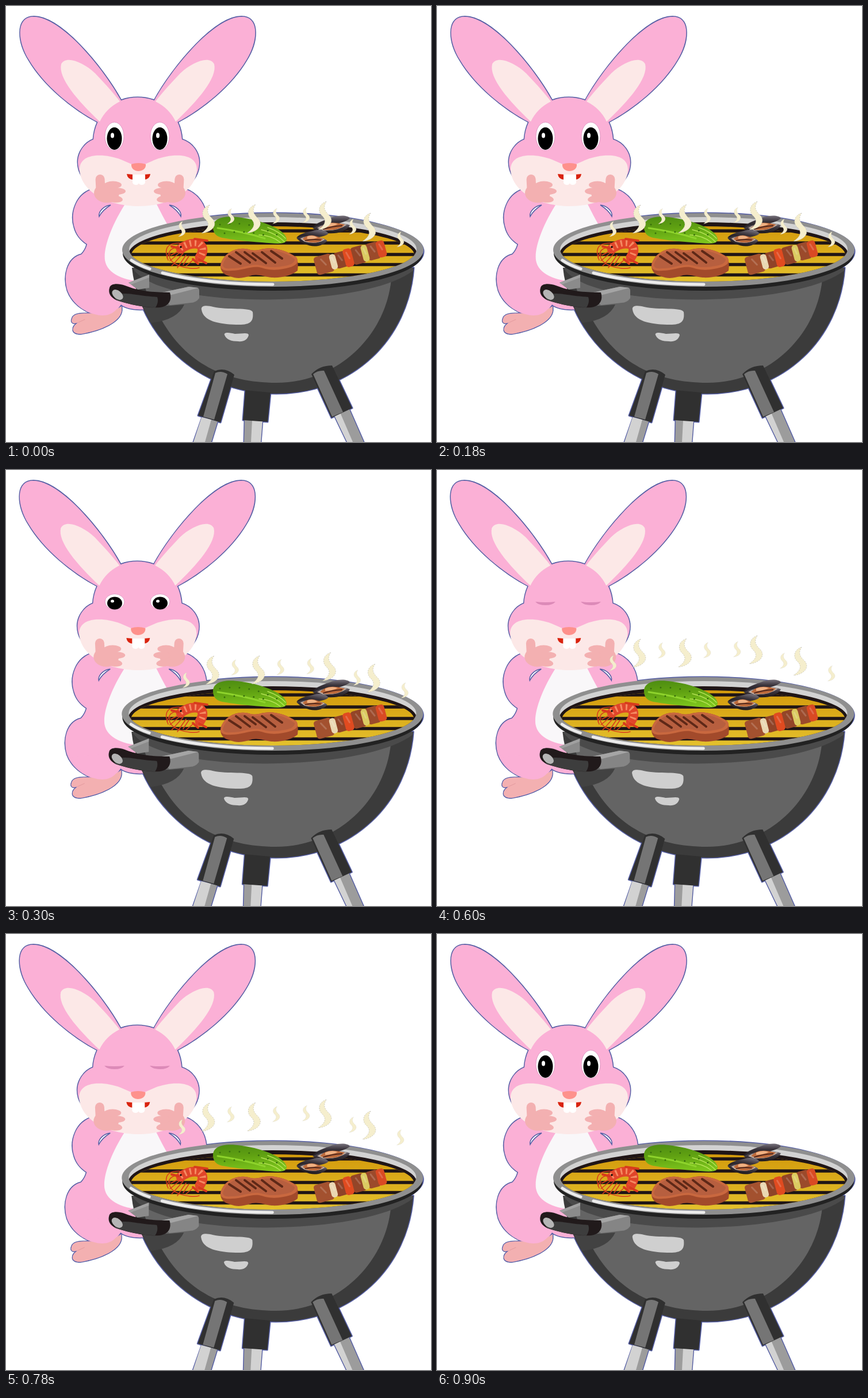
Animation of 739 by 758 pixels, one loop 1.2 s. Source, as an HTML page:

```html
<!DOCTYPE html>
<html lang="en">
<head>
<meta charset="utf-8">
<title>Rabbit at the barbecue</title>
<style>
html, body { margin: 0; width: 100%; height: 100%; overflow: hidden; background: #fff }
svg { display: block; width: 100%; height: 100% }
.line { fill: none; stroke-linecap: round; stroke-linejoin: round }
</style>
</head>
<body>
<svg viewBox="0 0 739 758">
<defs>
  <linearGradient id="coals" x2="0" y2="1"><stop stop-color="#d39a0c"/><stop offset="1" stop-color="#e5c32e"/></linearGradient>
  <linearGradient id="peel" x2=".15" y2="1"><stop stop-color="#4d8c12"/><stop offset=".45" stop-color="#5fa012"/><stop offset="1" stop-color="#7cc41c"/></linearGradient>
  <linearGradient id="shell" x2="0" y2="1"><stop stop-color="#77727c"/><stop offset=".45" stop-color="#3a343b"/><stop offset="1" stop-color="#1d191e"/></linearGradient>
  <clipPath id="opening"><ellipse cx="464" cy="423" rx="250" ry="56"/></clipPath>
  <clipPath id="grate"><ellipse cx="464" cy="433" rx="246" ry="50"/></clipPath>
  <path id="earShape" d="M200 164C169 107 91 12 43 19C18 23 20 62 40 94C66 138 116 179 160 202L185 215Z"/>
  <path id="footShape" d="M201 522C170 545 126 526 116 541C111 552 118 553 126 550C113 558 113 570 130 570C162 565 204 549 201 525Z"/>
  <g id="rabbitShape">
    <use href="#footShape"/>
    <path d="M153 318C122 325 111 360 119 385C123 400 132 408 141 414C139 422 135 428 131 432C106 438 99 470 107 495C115 517 140 537 168 538C185 538 195 527 200 519C210 527 230 529 245 527L330 480L349 368C347 345 334 326 311 318Z"/>
    <use href="#earShape"/>
    <use href="#earShape" transform="matrix(-1 0 0 1 458 0)"/>
    <path d="M229 159C270 159 303 188 306 232C325 238 336 255 336 272C336 291 325 306 311 317C300 340 265 348 231 348C197 348 162 340 153 317C136 306 125 290 125 271C125 255 136 238 152 232C155 188 188 159 229 159Z"/>
  </g>
  <path id="handleShape" d="M180 490C182 482 195 482 207 486C235 497 260 498 285 498C289 510 284 522 268 524C240 526 205 516 191 511C183 507 177 500 180 490Z"/>
  <path id="bowlShape" d="M219 455C231 569 331 674 470 674C603 674 700 579 709 455Z"/>
  <path id="legShape" d="M341 715L368 722L357 758H326ZM415 720H446L443 758H414ZM571 712L597 701L622 758H593Z"/>
  <path id="sleeveShape" d="M362 635Q380 627 397 641L373 724L334 712ZM416 668L460 672L455 723L412 720ZM531 640Q545 625 567 625L602 699L566 716Z"/>
  <g id="grillShape">
    <ellipse cx="464" cy="427" rx="262" ry="67"/>
    <use href="#bowlShape"/><use href="#legShape"/><use href="#sleeveShape"/><use href="#handleShape"/>
  </g>
  <g id="hand">
    <rect x="156" y="293" width="16" height="32" rx="8" transform="rotate(-3 164 309)"/>
    <ellipse cx="175" cy="325" rx="22" ry="17"/>
    <ellipse cx="186" cy="311" rx="15" ry="6.5"/>
    <ellipse cx="193" cy="322" rx="15" ry="6"/>
    <ellipse cx="188" cy="335" rx="15" ry="6.5" transform="rotate(8 188 335)"/>
  </g>
  <path id="innerEar" d="M163 201C125 165 90 125 96 101C104 85 135 98 155 117C175 138 190 155 198 166Q174 178 163 201Z"/>
  <path id="gap" d="M162 366C160 358 170 347 182 346C174 351 166 358 162 366Z"/>
  <path id="lip" fill="#d9230f" d="M210 292L221 293V302Q211 301 210 292Z"/>
  <g id="openEye">
    <ellipse cx="188.5" cy="226.5" rx="16.5" ry="24.5" fill="#fff" stroke="#d98cba" stroke-width=".8"/>
    <ellipse cx="188.5" cy="230.5" rx="13" ry="19.5"/>
    <ellipse cx="185" cy="225" rx="3" ry="4.5" fill="#fff"/>
  </g>
  <g id="halfEye">
    <ellipse cx="189" cy="229" rx="17" ry="13.5" fill="#fff" stroke="#d98cba" stroke-width=".8"/>
    <ellipse cx="189" cy="231.5" rx="13" ry="11"/>
    <ellipse cx="185" cy="228" rx="3" ry="2.5" fill="#fff"/>
  </g>
  <path id="shutEye" fill="#dc8ab8" d="M171 229Q188 231 206 229Q201 235 189 235Q176 235 171 229Z"/>
  <path id="wisp" d="M4-25C-9-21-12-8-3 0C5 8 2 16-10 24C5 23 19 12 10 0C2-8-3-14 4-25Z"/>
</defs>

<g id="scene">
  <g fill="none" stroke="#565fa5" stroke-width="3" stroke-linejoin="round">
    <use href="#rabbitShape"/><use href="#grillShape"/>
  </g>

  <!-- rabbit -->
  <use href="#rabbitShape" fill="#fbb0d6"/>
  <use href="#footShape" fill="#f3b0b1"/>
  <path fill="#fbb0d6" d="M110 500C118 520 142 537 168 538C185 538 195 527 200 515V490Z"/>
  <path class="line" stroke="#e39a9e" d="M126 550L137 545"/>
  <path fill="#f9f7f9" d="M208 343C184 380 169 420 172 442C176 466 205 478 245 480L330 430C288 405 275 368 261 343Z"/>
  <g fill="#fff" stroke="#565fa5" stroke-width="1.5">
    <use href="#gap"/><use href="#gap" transform="matrix(-1 0 0 1 466 0)"/>
  </g>
  <g fill="#fce8e7">
    <use href="#innerEar"/><use href="#innerEar" transform="matrix(-1 0 0 1 458 0)"/>
    <path d="M128 285C127 256 168 255 200 267Q216 274 230 280Q244 274 260 267C292 255 333 256 332 285C330 322 285 348 231 348C176 348 130 322 128 285Z"/>
  </g>
  <path fill="#fe918c" d="M218 275Q230 271 243 275C244 283 237 287 230 287C224 287 217 283 218 275Z"/>
  <use href="#lip"/><use href="#lip" transform="matrix(-1 0 0 1 461 0)"/>
  <path fill="#fff" d="M220 293H242V303Q243 311 236 311Q232 311 231 308Q230 311 226 311Q219 311 220 303Z"/>
  <g fill="#f3b0b1">
    <use href="#hand"/><use href="#hand" transform="matrix(-1 0 0 1 465 0)"/>
  </g>

  <!-- bowl -->
  <use href="#bowlShape" fill="#3b3b3b"/>
  <path fill="#646464" d="M238 475H670C660 575 575 655 470 655C380 655 312 620 270 545L245 500Z"/>
  <path fill="#4a4a4a" d="M220 455C260 528 620 528 708 460V455Z"/>
  <path fill="#424242" d="M238 522L285 521L310 519Q298 546 252 551Z"/>
  <g fill="#cfcfcf">
    <path d="M340 528C338 520 350 520 360 523C385 529 425 523 429 532C431 549 425 555 400 554C370 553 343 548 340 528Z"/>
    <path d="M380 572C378 566 390 568 398 570C410 570 421 567 422 572C420 581 412 584 404 583C392 583 383 580 380 572Z"/>
  </g>

  <!-- legs -->
  <use href="#legShape" fill="#9c9c9c"/>
  <path fill="#d2d2d2" d="M340 715L357 719L346 758H326ZM428 720H446L443 758H426ZM571 712L581 707L603 758H593Z"/>
  <use href="#sleeveShape" fill="#303030"/>
  <path fill="#757575" d="M364 638Q374 633 385 640L362 719L343 714ZM534 640Q542 633 553 634L586 706L567 714Z"/>

  <!-- rim and grate -->
  <ellipse cx="464" cy="430" rx="261" ry="65" fill="#222"/>
  <ellipse cx="464" cy="424" rx="262" ry="64" fill="#8f8f8f"/>
  <ellipse cx="464" cy="423" rx="250" ry="56" fill="#d2d2d2"/>
  <g clip-path="url(#opening)">
    <ellipse cx="464" cy="432" rx="251" ry="56" fill="#1f1516"/>
    <g clip-path="url(#grate)">
      <path fill="url(#coals)" d="M215 383H715V483H215Z"/>
      <path stroke="#1f1516" stroke-width="5.500" d="M215 391H715M215 412H715M215 432H715M215 449.500H715M215 467.500H715"/>
    </g>
  </g>
  <path class="line" stroke="#ececec" stroke-width="5" d="M218 442A257 60 0 0 0 250 457M272 464A257 60 0 0 0 464 484"/>

  <!-- handle -->
  <path fill="#8b8b8b" d="M213 481L249 467V490L229 493Z"/>
  <path fill="#a0a0a0" d="M213 481L249 467V472L218 484Z"/>
  <path fill="#858585" d="M262 500L318 488L333 490Q336 491 336 495V508Q330 516 321 516L285 520Z"/>
  <path fill="#a5a5a5" d="M262 500L318 488L335 490L288 502Z"/>
  <use href="#handleShape" fill="#211a1b"/>
  <path fill="#3d3d3d" d="M187 503C210 496 220 503 263 506Q266 515 260 524C235 524 205 516 191 511Z"/>
  <ellipse cx="194" cy="502" rx="7" ry="11" transform="rotate(-50 194 502)" fill="#b5b5b5"/>
</g>

<!-- cucumber -->
<path fill="url(#peel)" d="M360 386C359 369 378 363 410 368C452 374 486 390 488 405C488 416 470 413 445 411C415 409 392 406 376 403Q361 400 360 386Z"/>
<path class="line" stroke="#b4e254" stroke-width="1.500" d="M444 389Q470 395 484 410M440 398Q463 399 477 411M455 385Q475 392 486 404"/>
<path class="line" stroke="#8ed32c" stroke-width="3" d="M368 386Q415 393 450 404"/>
<path class="line" stroke="#39700c" stroke-width="3" stroke-dasharray="0 17" d="M372 380Q420 372 472 398M380 395Q420 388 462 402"/>

<!-- shrimp -->
<g class="line">
  <path stroke="#d83b1d" stroke-width="1.500" d="M310 413C270 408 278 432 282 442M306 419C285 418 283 428 280 438M303 425L287 433M303 428L285 443M308 430L288 452M313 433L298 455M318 435L308 450M285 430C278 450 320 460 336 455M326 441L313 452"/>
  <path stroke="#e0452a" stroke-width="17" d="M304 422Q320 410 336 414Q347 422 337 437"/>
  <path stroke="#f58a62" stroke-width="11" stroke-dasharray="3 6" stroke-linecap="butt" d="M303 421Q320 409 336 413Q348 422 337 438"/>
  <path stroke="#d83b1d" stroke-width="4" d="M328 405L350 408M336 441L348 447M325 440L334 448M300 421L288 418"/>
</g>
<circle cx="304" cy="419" r="1.700"/>

<!-- mussels -->
<g id="mussel">
  <path fill="url(#shell)" d="M533 385C540 376 553 373 568 367C582 363 595 364 598 369C590 377 570 380 545 386Z"/>
  <path fill="url(#shell)" d="M533 386C545 380 580 374 598 381C592 393 570 398 553 394C545 392 538 390 533 386Z"/>
  <path fill="#c4b2a7" d="M541 386Q563 374 593 380Q577 392 551 390Z"/>
  <path fill="#bd6a3b" d="M546 386C555 376 568 374 589 380C580 390 564 390 555 389Z"/>
  <path fill="#efb183" d="M555 380Q566 375 577 379Q567 384 555 384Z"/>
  <path class="line" stroke="#52281d" stroke-width="2" d="M552 388Q566 383 584 382"/>
</g>
<use href="#mussel" transform="translate(532 402) rotate(10) scale(.82 .98) translate(-565 -380)"/>

<!-- steak -->
<path fill="#a24a2b" d="M373 452C374 440 386 424 408 422C422 420 425 427 440 424C462 417 486 424 505 437Q509 445 507 460C498 468 480 473 462 472C448 470 440 466 428 468C414 473 402 475 390 470Q373 466 373 452Z"/>
<path fill="#c9683f" d="M373 452C374 440 386 424 408 422C422 420 425 427 440 424C462 417 486 424 505 437C512 448 500 454 482 457C462 461 452 457 440 454C425 452 410 460 393 460Q374 462 373 452Z"/>
<path fill="#b75f3f" d="M377 451C379 440 390 427 410 425C424 425 430 430 442 427C464 421 486 428 502 440C502 449 490 451 478 453C460 456 450 452 438 450C422 449 410 456 393 456Q378 458 377 451Z"/>
<path class="line" stroke="#5e2817" stroke-width="4" d="M388 435L408 448M400 428L424 446M415 428L434 442M429 430L452 447M445 428L468 446M461 426L480 439"/>

<g id="skewer" transform="translate(538 453) rotate(-15)"></g>
<g id="eyes"></g>
<g id="steam" fill="#f5eecd" stroke="#bbb9b0" stroke-width=".7" stroke-dasharray="2 2"></g>
</svg>
<script>
const $ = id => document.getElementById(id);

// position along the stick, width, height, colour
const chunks = [
  [0, 31, 32, '#a3512f'], [35, 21, 28, '#8f4328'], [66, 23, 31, '#934528'], [93, 22, 30, '#9b4a2b'],
  [27, 11, 27, '#ead7b2'], [52, 15, 32, '#e04b20'], [84, 11, 29, '#dbcb62'], [111, 15, 29, '#d94a24']
];
$('skewer').innerHTML = chunks.map(([x, w, h, color]) =>
  `<rect x="${x}" y="${-h / 2}" width="${w}" height="${h}" rx="5" fill="${color}"/>
   <path class="line" stroke="#fff" stroke-opacity=".18" stroke-width="3" d="M${x + w * .4} ${-h * .3}l${w * .2} ${h * .35}"/>`
).join('');

// x, y, scale
const wisps = [
  [305, 388, .54], [350, 371, 1], [390, 366, .54], [429.5, 370.5, 1], [469, 365.5, .54],
  [521, 364, .54], [553, 365, 1], [602, 384, .54], [630, 385, 1], [685, 406, .54]
];
$('steam').innerHTML = wisps.map(([x, y, s]) =>
  `<use href="#wisp" transform="translate(${x} ${y}) scale(${s})"/>`).join('');

const poses = [
  { eye: 'openEye', steam: [0, 0], shift: 0 },
  { eye: 'halfEye', steam: [7.5, -22.5], shift: -.7 },
  { eye: 'shutEye', steam: [0, -52], shift: -.7 },
  { eye: 'openEye', steam: null, shift: 0 }
];
let shown;

function draw(now) {
  const pose = poses[Math.floor(now % 1200 / 300)];
  if (pose === shown) return;
  shown = pose;
  $('eyes').innerHTML = [0, 79].map(x => `<use href="#${pose.eye}" x="${x}"/>`).join('');
  $('scene').setAttribute('transform', `translate(${pose.shift})`);
  $('steam').setAttribute('visibility', pose.steam ? 'visible' : 'hidden');
  if (pose.steam) $('steam').setAttribute('transform', `translate(${pose.steam})`);
}

const start = performance.now();
function tick() {
  draw(performance.now() - start);
  requestAnimationFrame(tick);
}
tick();
</script>
</body>
</html>
```
